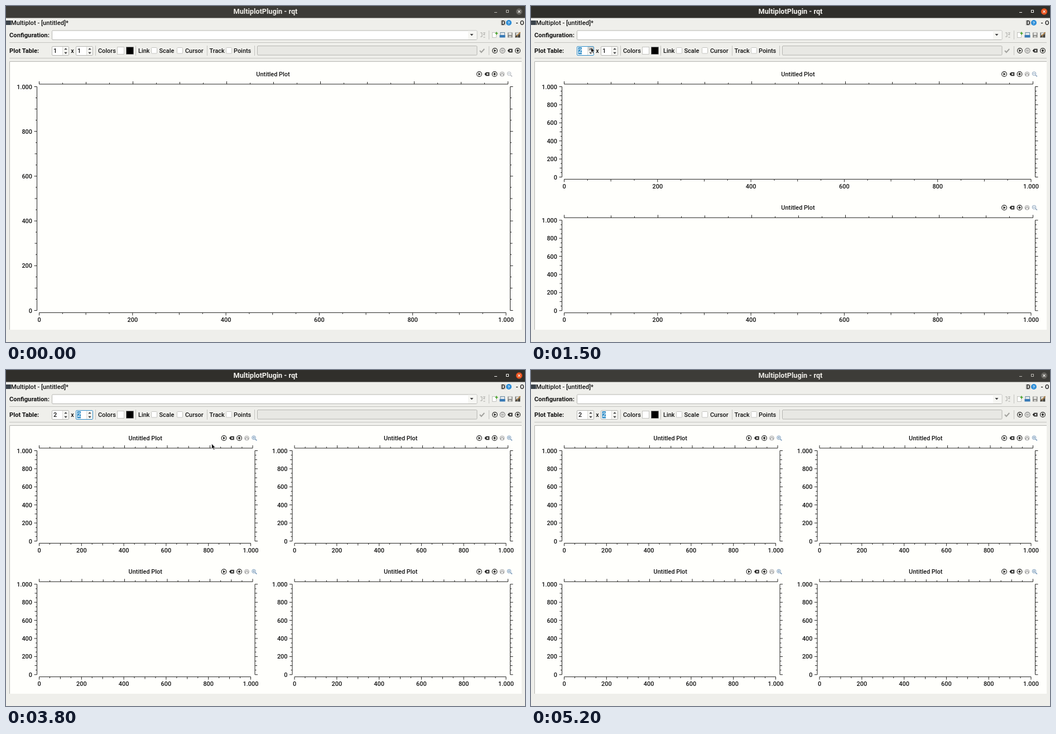
These frames come from a looping animation (930x602 px, 5.3 s). An HTML page:

```html
<!DOCTYPE html>
<html lang="en">
<head>
<meta charset="utf-8">
<title>Multiplot</title>
<style>
html, body { margin: 0; width: 100%; height: 100%; overflow: hidden; background: #efefeb; }
svg { display: block; width: 100%; height: 100%; font: 500 10.9px Roboto, "Open Sans", sans-serif; }
.bold { font-weight: 700; }
</style>
</head>
<body>
<svg id="stage" viewBox="0 0 930 602"></svg>
<script>
const NS = 'http://www.w3.org/2000/svg';
const stage = document.getElementById('stage');
const INK = '#222220', PAPER = '#fffffc', EDGE = '#b5b5b1', BLUE = '#308cc6';

function add(parent, tag, attrs = {}, text) {
  const node = document.createElementNS(NS, tag);
  for (const key in attrs) node.setAttribute(key, attrs[key]);
  if (text !== undefined) node.textContent = text;
  return parent.appendChild(node);
}
const group = (parent, x = 0, y = 0) => add(parent, 'g', { transform: `translate(${x} ${y})` });
const rect = (p, x, y, width, height, fill, extra) => add(p, 'rect', { x, y, width, height, fill, ...extra });
const path = (p, d, stroke = INK, extra) => add(p, 'path', { d, fill: 'none', stroke, ...extra });
const shape = (p, d, fill = INK, extra) => add(p, 'path', { d, fill, ...extra });
const circle = (p, cx, cy, r, fill, extra) => add(p, 'circle', { cx, cy, r, fill, ...extra });
const label = (p, x, y, text, extra) => add(p, 'text', { x, y, fill: '#111', ...extra }, text);
const show = (node, on) => node.setAttribute('visibility', on ? 'visible' : 'hidden');

// Icons, each centred on (x, y)
const icons = {
  ring(p, x, y, color = INK) {
    const g = group(p, x, y);
    circle(g, 0, 0, 4.4, 'none', { stroke: color, 'stroke-width': 1.1 });
    return g;
  },
  play(p, x, y) { shape(icons.ring(p, x, y), 'M-1.5-2.6L2.6 0L-1.5 2.6Z'); },
  pause(p, x, y) { path(icons.ring(p, x, y, '#777'), 'M-1.2-2V2M1.2-2V2', '#777'); },
  up(p, x, y) { shape(icons.ring(p, x, y), 'M0-2.8L2.8 .6H1V2.2H-1V.6H-2.8Z'); },
  clear(p, x, y) {
    const g = group(p, x, y);
    shape(g, 'M-4.6 0L-1.8-3.2H4.2V3.2H-1.8Z');
    path(g, 'M-.8-1.6L2.4 1.6M2.4-1.6L-.8 1.6', '#fff', { 'stroke-width': 1.2 });
  },
  dial(p, x, y) {
    const g = group(p, x, y);
    circle(g, 0, 0, 4, '#ececea', { stroke: '#aaa' });
    path(g, 'M-2.4 2.6V0Q0-3 2.4 0V2.6', '#888');
  },
  zoom(p, x, y, tone, plus) {
    const g = group(p, x, y);
    circle(g, -.8, -.8, 3.3, '#f3f7fa', { stroke: tone });
    path(g, 'M1.8 1.8L4.6 4.4', tone, { 'stroke-width': 1.7 });
    path(g, plus ? 'M-2.8-.8H1.2M-.8-2.8V1.2' : 'M-2.8-.8H1.2', tone);
  }
};

function axis(p, { x, y, length, horizontal, side, labelled }) {
  let d = horizontal ? `M${x} ${y}h${length}` : `M${x} ${y}v${length}`;
  for (let v = 0; v <= 1000; v += 50) {
    const size = side * (v % 200 === 0 ? 5 : v % 100 === 0 ? 4 : 2.5);
    const at = length * v / 1000;
    const tx = horizontal ? x + at : x;
    const ty = horizontal ? y : y + length - at;
    d += `M${tx} ${ty}${horizontal ? 'v' : 'h'}${size}`;
    if (labelled && v % 200 === 0) {
      const text = v === 1000 ? '1.000' : v;
      if (horizontal) label(p, tx, y + 16.5, text, { 'text-anchor': 'middle' });
      else label(p, 47, ty + 4, text, { 'text-anchor': 'end' });
    }
  }
  path(p, d);
}

function plot(p, dx, dy, right, height, tone, plus) {
  const g = group(p, dx, dy);
  label(g, (55.5 + right) / 2 - 1, 125.5, 'Untitled Plot', { 'text-anchor': 'middle' });
  axis(g, { x: 59.5, y: 140, length: right - 63.5, horizontal: true, side: -1 });
  axis(g, { x: 59.5, y: 148.4 + height, length: right - 67, horizontal: true, side: 1, labelled: true });
  axis(g, { x: 55.5, y: 144.5, length: height, side: -1, labelled: true });
  axis(g, { x: right, y: 144.5, length: height, side: 1 });
  icons.play(g, right - 55.5, 122);
  icons.clear(g, right - 41.5, 122);
  icons.up(g, right - 28, 122);
  icons.dial(g, right - 14.5, 122);
  icons.zoom(g, right - 1.2, 122, tone, plus);
}

function plotTable(rows, cols, tone, plus) {
  const g = group(stage);
  for (let r = 0; r < rows; r++)
    for (let c = 0; c < cols; c++)
      plot(g, c * 457.5, r * 239.3, cols === 2 ? 446 : 903.5, rows === 2 ? 162 : 401, tone, plus);
  return g;
}

function titleBar(active) {
  const g = group(stage);
  const light = active ? '#f4f3ef' : '#bcbab4';
  rect(g, 0, 0, 930, 21.5, active ? '#302f2b' : '#3d3c38');
  label(g, 465, 14, 'MultiplotPlugin - rqt',
    { class: 'bold', 'text-anchor': 'middle', 'font-size': 12.7, style: `fill:${active ? '#f5f4f0' : '#eeece7'}` });
  path(g, 'M875 11.5h5', light);
  rect(g, 896.5, 7.5, 4, 4, 'none', { stroke: light });
  circle(g, 919.5, 10, 5.7, active ? '#e95420' : '#65635e');
  path(g, 'M917.4 7.9l4.2 4.2M921.6 7.9l-4.2 4.2', '#f4f3ef', { 'stroke-width': 1.1 });
  return g;
}

function spinBox(x) {
  const g = group(stage, x, 72);
  const frame = rect(g, .5, .5, 30, 16, '#fff', { rx: 1.5, stroke: EDGE });
  shape(g, 'M20 1H30V16H20Z', '#f6f6f3');
  const pressed = rect(g, 20, 1, 10, 7.5, '#cfcfcb');
  path(g, 'M19.5 1v15', '#dcdcd8');
  shape(g, 'M22.2 6.3L25 3.2L27.8 6.3ZM22.2 10.8L25 13.9L27.8 10.8Z', '#444');
  const selection = rect(g, 2.5, 2, 6.5, 12.5, BLUE);
  const digit = label(g, 3, 12.2, '1');
  return (value, focused, selected, down) => {
    digit.textContent = value;
    digit.setAttribute('fill', selected ? '#eef6fb' : '#111');
    frame.setAttribute('stroke', focused ? BLUE : EDGE);
    show(selection, selected);
    show(pressed, down);
  };
}

function checkBox(x) { rect(stage, x + .5, 74.5, 10, 10.5, '#fff', { stroke: '#c4c4c0', rx: 1 }); }

// Window chrome
rect(stage, 0, 0, 930, 602, '#efefeb');
const inactiveBar = titleBar(false), activeBar = titleBar(true);
rect(stage, 0, 26, 9, 8, '#3b434a');
label(stage, 9, 34, 'Multiplot - [untitled]*', { 'font-size': 11.2 });
rect(stage, 886, 25, 10, 10, '#d3d3cf', { rx: 2 });
label(stage, 887.5, 34, 'D');
circle(stage, 901, 30, 5, '#2f8fd8');
label(stage, 901, 33, '?', { 'font-size': 8, 'text-anchor': 'middle', style: 'fill:#fff' });
label(stage, 913.5, 34, '-', { class: 'bold' });
label(stage, 921, 34, 'O');

label(stage, 6, 56, 'Configuration:', { class: 'bold', 'font-size': 11.2 });
rect(stage, 82.5, 44, 761.5, 16.5, '#fff', { rx: 1.5, stroke: EDGE });
rect(stage, 828, 44.5, 15.5, 15.5, '#f6f6f3');
shape(stage, 'M831.5 50h6l-3 3.6Z', '#444');
path(stage, 'M850 48h3v7h-3M855 48h3.5l-3 3.5h3M855.5 56h3', '#a5a5a1');
path(stage, 'M6 65.5H924M6 93.5H924', '#c3c3bf');
path(stage, 'M865.5 44V60M865.5 72V88M160.5 71V89M232.5 71V89M360.5 71V89M445.5 71V89', '#c3c3bf');

rect(stage, 871.5, 47.5, 7, 9, '#fff', { stroke: '#b5b5b1', 'stroke-width': .8 });
path(stage, 'M876.5 49h5M879 46.5v5', '#4aa52e', { 'stroke-width': 1.7 });
rect(stage, 886, 47.5, 7.5, 5, '#e4e8ec', { stroke: '#4a7390', 'stroke-width': .8 });
rect(stage, 884.5, 52, 10, 4.5, '#3679b5');
rect(stage, 899, 47.5, 8.5, 9, '#858582');
rect(stage, 900.5, 48, 5.5, 4, '#e4e4e1');
rect(stage, 901, 53.5, 4.5, 3, '#d0d0cc');
rect(stage, 912.5, 47.5, 9, 9, '#6a6a66');
rect(stage, 914, 48, 5.5, 4, '#dededb');
path(stage, 'M914 55l7.5-8', '#b07a35', { 'stroke-width': 1.7 });
path(stage, 'M913 56l2-2M919.5 51v5.5', INK, { 'stroke-width': 1.5 });

label(stage, 6, 84, 'Plot Table:', { class: 'bold', 'font-size': 11.2 });
const rowSpin = spinBox(82), colSpin = spinBox(125);
label(stage, 116.2, 84, 'x');
[[165, 'Colors'], [237, 'Link'], [274.5, 'Scale'], [321, 'Cursor'], [364.5, 'Track'], [408, 'Points']]
  .forEach(([x, text]) => label(stage, x, 83.8, text));
rect(stage, 199.5, 73.5, 12, 13, '#fff', { stroke: '#c4c4c0' });
rect(stage, 215.5, 73.5, 13, 13, '#000', { stroke: '#888', 'stroke-width': .6 });
[260, 306, 394].forEach(checkBox);
rect(stage, 450.5, 71.5, 393.5, 16.5, '#e8e8e4', { rx: 1.5, stroke: EDGE });
path(stage, 'M849 80l2.8 3l5.4-6', '#a2a29e', { 'stroke-width': 2 });
icons.play(stage, 876, 80);
icons.pause(stage, 889.7, 80);
icons.clear(stage, 903.3, 80);
icons.up(stage, 917, 80);

rect(stage, 6, 99, 918, 481, PAPER);
path(stage, 'M6.5 580V99.5H924', EDGE);
const tables = {
  '1x1': plotTable(1, 1, '#b9bcc0', false),
  '2x1': plotTable(2, 1, '#8fa6bd', false),
  '2x2': plotTable(2, 2, '#7f9fbd', true)
};

// Crosshair readout of the first plot
const tracker = group(stage);
const guides = path(tracker, '', '#a9a9a6', { 'stroke-width': .8, 'stroke-dasharray': '2.4 1.6' });
const readout = label(tracker, 441.5, 0, '', { 'text-anchor': 'end', 'font-size': 10.5 });
function track(x, y) {
  guides.setAttribute('d', `M57 ${y}H${x}V307`);
  readout.setAttribute('y', Math.max(y - 3, 155));
  readout.textContent = `${((x - 59.5) / .379).toFixed(3)}, ${((306.5 - y) / .162).toFixed(3)}`;
}

const pointers = { arrow: group(stage), beam: group(stage), cross: group(stage) };
shape(pointers.arrow, 'M0 0V9.6L2.2 7.6L3.8 11.2L5.5 10.4L3.9 7H6.8Z', '#111', { stroke: '#fff', 'stroke-width': .7 });
path(pointers.beam, 'M-2.5-5.5H-.6L0-5L.6-5.5H2.5M0-5V5M-2.5 5.5H-.6L0 5L.6 5.5H2.5', '#222');
path(pointers.cross, 'M-6 0H6M0-6V6', '#fff', { 'stroke-width': 2.6 });
path(pointers.cross, 'M-6 0H6M0-6V6', '#222', { 'stroke-width': 1.3 });

// [ms, pointer, x, y]
const pointerSteps = [
  [0], [600, 'arrow', 2, 230], [700, 'arrow', 50, 185], [800, 'arrow', 97, 150], [900, 'arrow', 107, 105],
  [1200, 'arrow', 107, 93], [1300, 'arrow', 107, 82], [1400, 'arrow', 107.5, 74],
  [2100, 'beam', 121, 75], [2300, 'beam', 134, 76], [2400, 'arrow', 145, 74], [2600, 'arrow', 147.5, 74.5],
  [3300, 'arrow', 152, 78], [3400, 'arrow', 180, 85], [3500, 'arrow', 227, 97], [3600, 'arrow', 282, 111],
  [3700, 'arrow', 334, 124], [3800, 'arrow', 368.5, 132],
  [3900, 'cross', 400, 153], [4000, 'cross', 423, 158], [4100, 'cross', 434, 148], [4300, 'cross', 436, 155],
  [4500, 'arrow', 350, 128], [4600, 'arrow', 224, 90], [4800, 'arrow', 47.5, 21], [5000, 'arrow', 31.5, 5], [5100]
];
// [ms, change]
const windowSteps = [
  [0, { active: false, rows: 1, cols: 1, focus: '', down: '', guide: null }],
  [1400, { active: true, focus: 'rows', down: 'rows' }],
  [1500, { rows: 2 }],
  [1700, { down: '' }],
  [2600, { focus: 'cols', down: 'cols' }],
  [2700, { cols: 2 }],
  [3000, { down: '' }],
  [3900, { guide: [400, 153] }],
  [4000, { guide: [423, 158] }],
  [4100, { guide: [434.5, 148] }],
  [4300, { guide: [436.027, 151.3016] }],
  [4500, { guide: null }],
  [5100, { active: false }]
];

function render(t) {
  const s = Object.assign({}, ...windowSteps.filter(step => step[0] <= t).map(step => step[1]));
  show(activeBar, s.active);
  show(inactiveBar, !s.active);
  for (const name in tables) show(tables[name], name === `${s.rows}x${s.cols}`);
  rowSpin(s.rows, s.active && s.focus === 'rows', s.focus === 'rows', s.down === 'rows');
  colSpin(s.cols, s.active && s.focus === 'cols', s.focus === 'cols', s.down === 'cols');
  show(tracker, s.guide);
  if (s.guide) track(...s.guide);

  const [, kind, x, y] = pointerSteps.filter(step => step[0] <= t).pop();
  for (const name in pointers) show(pointers[name], name === kind);
  if (kind) pointers[kind].setAttribute('transform', `translate(${x} ${y})`);
}

const start = performance.now();
function frame() {
  render((performance.now() - start) % 5300);
  requestAnimationFrame(frame);
}
frame();
</script>
</body>
</html>
```
